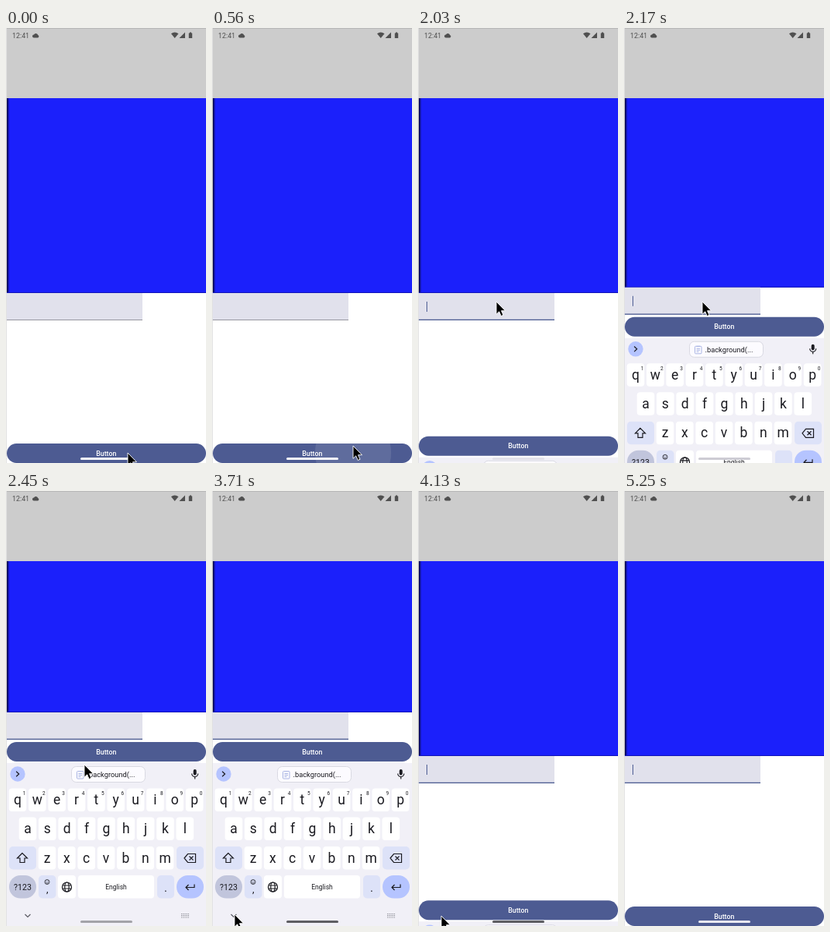
These frames come from a looping animation (258x558 px, 5390 ms). An HTML page:

```html
<!DOCTYPE html>
<html lang="en">
<head>
<meta charset="utf-8">
<title>Keyboard insets</title>
<style>
  html, body { margin: 0; width: 258px; height: 558px; overflow: hidden; background: #fff; }
  svg { display: block; font-family: Roboto, sans-serif; }
</style>
</head>
<body>
<svg id="stage" width="258" height="558" viewBox="0 0 258 558">
  <rect width="1" height="558" fill="#e2e2e2"/>
  <rect x="1" width="257" height="90" fill="#ccc"/>
  <rect x="1" width="257" height="1" fill="#b8b8b8"/>
  <g fill="#505050">
    <text x="8" y="13" font-size="8.9">12:41</text>
    <path d="M36 12.5a2 2 0 0 1 0-4a2.8 2.8 0 0 1 5.2 .6a1.8 1.8 0 0 1 0 3.4Z"/>
    <path d="M213 7.2Q217.5 4 222.500 7.200L217.700 13Z"/>
    <path d="M223.500 13H231V5.500Z"/>
    <path d="M235.800 6.500h1.200v-1h2v1h1.200v6.500h-4.400Z"/>
  </g>

  <g id="box">
    <rect x="1" y="90" width="257" height="250" fill="#1b20fb"/>
    <rect x="1" y="90" width="1.500" height="250" fill="#00003a"/>
    <rect x="2.500" y="90" width="1.500" height="250" fill="#1114a6"/>
  </g>
  <g id="field">
    <rect x="1" y="339" width="257" height="1" fill="#1215b8"/>
    <rect x="1" y="340" width="175" height="35" fill="#e1e1ec"/>
    <rect id="line" x="1" width="175"/>
    <rect id="caret" x="11" y="351" width="1" height="13" fill="#4c5c92"/>
  </g>

  <g id="button">
    <rect x="1" y="533" width="257" height="25" rx="12.500" fill="#4d5b92"/>
    <clipPath id="pill"><rect x="1" y="533" width="257" height="25" rx="12.500"/></clipPath>
    <g clip-path="url(#pill)"><circle id="ripple" cx="182" cy="545" fill="#fff"/></g>
    <text x="129.300" y="548.700" font-size="8.800" font-weight="500" fill="#fff" text-anchor="middle">Button</text>
  </g>

  <g id="keyboard">
    <rect x="1" y="349" width="257" height="211" fill="#f1f0f7"/>
    <circle cx="15" cy="363" r="9.700" fill="#b5c4ff"/>
    <rect x="84.500" y="353.500" width="95" height="20" rx="6" fill="#fcfbff" stroke="#d9d9e2"/>
    <text x="104.500" y="367" font-size="9.300" fill="#1b1b21">.background(...</text>
    <g fill="none" stroke="#a9b4e3">
      <rect x="91.500" y="359.500" width="8.500" height="9.500" rx="1"/>
      <path d="M93.500 359.500h4.500M93.500 362.500h4.500M93.500 364.500h4.500M93.500 366.500h3" />
    </g>
    <g id="keys" text-anchor="middle" fill="#1b1b21"></g>
    <rect x="241.700" y="357" width="4" height="7.500" rx="2" fill="#1b1b21"/>
    <g fill="none" stroke="#1b1b21" stroke-width="1.200">
      <path d="M13.200 359.700l3.500 3.300-3.500 3.300"/>
      <path d="M239.700 362.500a4 4 0 0 0 8 0M243.700 366.500v3"/>
      <path d="M21 464.500l-6.500 6.500h3.500v5.500h6v-5.500h3.500Z"/>
      <path d="M230 471l4.500-5.500h10v11h-10ZM236.500 468.500l5 5m0-5l-5 5"/>
      <circle cx="78.500" cy="508" r="6"/>
      <ellipse cx="78.500" cy="508" rx="2.700" ry="6"/>
      <path d="M73 506h11M73 510h11"/>
      <path d="M243 504.500v4h-11m3.500-3.500l-3.500 3.500 3.500 3.500"/>
      <g stroke-width=".8">
        <circle cx="53" cy="501.500" r="3"/>
        <path d="M51.300 502.300q1.700 1.800 3.400 0M51.500 500.500h.8M53.700 500.500h.8"/>
      </g>
      <path stroke="#5c5c64" d="M24.500 543l3.500 3.500 3.500-3.500"/>
      <path stroke="#8a8a93" stroke-dasharray="1.200 1" d="M226 542.500h10M226 544.700h10M226 547h10"/>
    </g>
  </g>

  <rect id="bar" x="96" y="551" width="67" height="3" rx="1.500"/>
  <path id="mouse" d="M0 0V16.300L3.700 12.800 6.200 18.500 9 17.300 6.500 11.700H11.500Z" fill="#000" stroke="#fff" stroke-width=".9"/>
</svg>
<script>
const LOOP = 5390, STEP = 70;
const el = Object.fromEntries([...document.querySelectorAll('[id]')].map(e => [e.id, e]));
const set = (e, attrs) => { for (const k in attrs) e.setAttribute(k, attrs[k]); };

function key(x, y, w, fill, radius, label, size, baseline) {
  const text = label ? `<text x="${x + w / 2}" y="${y + baseline}" font-size="${size}">${label}</text>` : '';
  return `<rect x="${x}" y="${y}" width="${w}" height="29.500" rx="${radius}" fill="${fill}"/>` + text;
}
const row = (letters, center, y) => [...letters].map((c, i) =>
  key(center + i * 25.35 - 11.3, y, 22.6, '#fff', 4, c, 17.5, 20.5)).join('');

el.keys.innerHTML =
  row('qwertyuiop', 15, 381.5) + row('asdfghjkl', 28, 418.5) + row('zxcvbnm', 53, 456) +
  [...'1234567890'].map((c, i) => `<text x="${23.5 + i * 25.35}" y="390" font-size="6.500">${c}</text>`).join('') +
  key(4, 456, 35, '#dde2f8', 5) +
  key(220, 456, 35, '#dde2f8', 5) +
  key(4, 493, 35, '#c1c5dc', 14.7, '?123', 10.6, 19) +
  key(42, 493, 22.5, '#dde2f8', 5, ',', 13, 22) +
  key(67, 493, 23, '#fff', 4) +
  key(93, 493, 98, '#fff', 4, 'English', 8.5, 18) +
  key(195, 493, 22, '#dde2f8', 5, '.', 15, 21) +
  key(220, 493, 35, '#b5c4ff', 14.7);

// Each entry: time, then the values to interpolate.
const mousePath = [
  [0, 157, 545], [280, 195, 522], [350, 195, 522], [420, 182, 536], [1190, 182, 536],
  [1610, 112, 334], [1680, 110, 330], [1820, 101, 351], [3010, 101, 351],
  [3430, 29, 543], [3850, 29, 543], [4060, 30, 545], [4200, 30, 545], [4620, 30, 560]
];
const barColor = [
  [0, 246, 246, 250], [560, 246, 246, 250], [1190, 155, 161, 187], [1820, 222, 222, 232],
  [2030, 226, 225, 233], [2450, 163, 163, 169], [2940, 94, 94, 99],
  [4200, 94, 94, 99], [5250, 232, 232, 240]
];

function at(track, t) {
  const i = track.findIndex(k => k[0] > t);
  if (i < 0) return track[track.length - 1].slice(1);
  const a = track[i - 1], b = track[i], p = (t - a[0]) / (b[0] - a[0]);
  return a.slice(1).map((v, n) => v + (b[n + 1] - v) * p);
}

const clamp = x => Math.min(1, Math.max(0, x));

// cubic-bezier(.4, 0, .2, 1)
function ease(x) {
  x = clamp(x);
  let lo = 0, hi = 1;
  for (let i = 0; i < 20; i++) {
    const s = (lo + hi) / 2;
    if (1.2 * s * (1 - s) ** 2 + .6 * s * s * (1 - s) + s ** 3 < x) lo = s; else hi = s;
  }
  return lo * lo * (3 - 2 * lo);
}

function draw(t) {
  const inset = 211 * (ease((t - 1982) / 380) - ease((t - 3841) / 380));
  const lift = Math.max(0, inset - 155);
  set(el.button, { transform: `translate(0 ${-inset})` });
  set(el.keyboard, { transform: `translate(0 ${211 - inset})` });
  set(el.field, { transform: `translate(0 ${-lift})` });
  for (const r of el.box.children) set(r, { height: 250 - lift });

  const focused = t >= 1960;
  set(el.line, focused ? { y: 373.7, height: 1.3, fill: '#4c5c92' } : { y: 374.3, height: .7, fill: '#777680' });
  const caretOn = [1820, 2870, 3850, 4900].some(start => t >= start && t < start + 490);
  set(el.caret, { visibility: caretOn ? 'visible' : 'hidden' });

  const press = clamp((t - 500) / 350);
  set(el.ripple, {
    r: t < 560 ? 0 : 20 + 170 * press,
    opacity: t < 1960 ? .1 - .05 * clamp((t - 850) / 200) : 0
  });

  set(el.bar, { fill: `rgb(${at(barColor, t)})` });
  set(el.mouse, { transform: `translate(${at(mousePath, t)})` });
}

function frame() {
  draw(Math.floor(performance.now() % LOOP / STEP) * STEP);
  requestAnimationFrame(frame);
}
frame();
</script>
</body>
</html>
```
